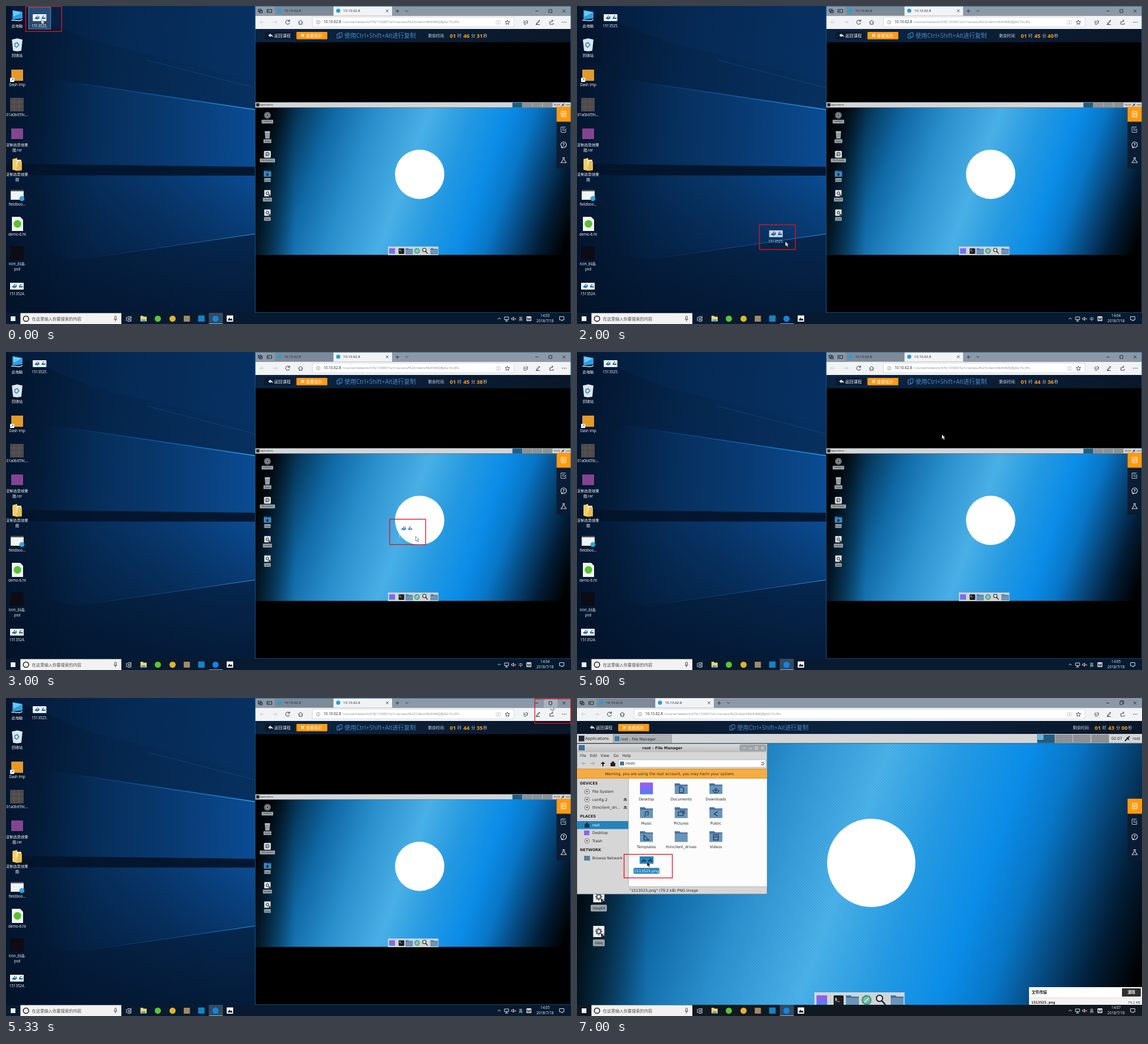
An HTML page that plays this animation: 960x540 px, repeating every 8 s.

```html
<!DOCTYPE html>
<html lang="zh">
<head>
<meta charset="utf-8">
<title>Drag a file into a remote desktop</title>
<style>
  html, body { margin: 0; width: 100%; height: 100%; overflow: hidden; background: #000; }
  svg { display: block; width: 960px; height: 540px; }
  text { font-family: "Open Sans", "Noto Sans CJK SC", "Noto Sans CJK", sans-serif; white-space: pre; }
  .dv { font-family: "DejaVu Sans", sans-serif; }
  .mono { font-family: "DejaVu Sans Mono", monospace; font-weight: bold; }
  .b { font-weight: bold; }
</style>
</head>
<body>
<svg id="stage" viewBox="0 0 960 540"></svg>
<script>
const LOOP = 8000;
const steps = [
  { at: 0, left: '46:31', clock: '14:03', ime: '英', box: [33.5, .7, 61, 42.5], cur: [60, 23], picked: true },
  { at: 1000, left: '45:44', clock: '14:04', ime: '中', box: [171, 184, 61, 43], cur: [215, 213], drag: [199, 200] },
  { at: 2000, left: '45:40', clock: '14:04', ime: '中', box: [310, 371.5, 61, 42], cur: [354, 400], drag: [338, 387] },
  { at: 3000, left: '45:38', clock: '14:04', ime: '中', box: [652, 284, 61, 43], cur: [696, 313], drag: [680, 300] },
  { at: 4000, left: '43:26', clock: '14:06', ime: '英', box: [753.5, 484.5, 206, 41.5], cur: [143, 317], transfer: true },
  { at: 5000, left: '44:36', clock: '14:05', ime: '英', cur: [620, 140] },
  { at: 5330, left: '44:35', clock: '14:05', ime: '英', box: [898.5, 1.5, 61, 41.5], cur: [926, 13], hover: true },
  { at: 6000, left: '44:16', clock: '14:06', ime: '英', box: [2.5, 256, 76, 55], cur: [36.5, 281], dark: true, max: true },
  { at: 7000, left: '43:00', clock: '14:07', ime: '英', box: [80, 265.5, 82, 40], cur: [119, 278], dark: true, max: true, files: true, transfer: true }
];

const rect = (x, y, w, h, fill, more = '') => `<rect x="${x}" y="${y}" width="${w}" height="${h}" fill="${fill}" ${more}/>`;
const dot = (x, y, r, fill, more = '') => `<circle cx="${x}" cy="${y}" r="${r}" fill="${fill}" ${more}/>`;
const line = (d, stroke, w = .8, fill = 'none') => `<path d="${d}" stroke="${stroke}" stroke-width="${w}" fill="${fill}"/>`;
const area = (d, fill, more = '') => `<path d="${d}" fill="${fill}" ${more}/>`;
// y is the middle of the line
const text = (x, y, s, size, fill, more = '') => `<text x="${x}" y="${y + size * .36}" font-size="${size}" fill="${fill}" ${more}>${s}</text>`;
const mid = (x, y, s, size, fill, more = '') => text(x, y, s, size, fill, 'text-anchor="middle" ' + more);
const move = (x, y, s) => `<g transform="translate(${x} ${y})">${s}</g>`;
const stops = list => list.map(([o, c, a = 1]) => `<stop offset="${o}" stop-color="${c}" stop-opacity="${a}"/>`).join('');
const grad = (id, x1, y1, x2, y2, list) =>
  `<linearGradient id="${id}" gradientUnits="userSpaceOnUse" x1="${x1}" y1="${y1}" x2="${x2}" y2="${y2}">${stops(list)}</linearGradient>`;

const defs = '<defs>' +
  grad('navy', 0, 0, 423, 60, [[0, '#03132a'], [.45, '#05264c'], [1, '#07305f']]) +
  grad('beam', 60, 0, 423, 0, [[0, '#0a4b8e', 0], [.5, '#0a4586', .45], [1, '#0b55a4', .75]]) +
  grad('edge', 110, 0, 423, 0, [[0, '#1673c4', 0], [.6, '#1673c4', .7], [1, '#3ca0ee']]) +
  grad('shade', 0, 0, 0, 521, [[.55, '#020d1f', 0], [1, '#020d1f', .6]]) +
  grad('sky', 0, 61, 1015, 428, [[0, '#000'], [.055, '#020d16'], [.14, '#07426b'], [.22, '#106ba8'], [.33, '#2b91d0'],
    [.47, '#4bb3ea'], [.58, '#259ce6'], [.68, '#0b8fec'], [.75, '#0878ca'], [.82, '#064a80'], [.89, '#021d36'], [.96, '#000']]) +
  grad('rim', 0, 0, 120, 0, [[0, '#000', .7], [1, '#000', 0]]) +
  grad('title', 0, 78, 0, 92, [[0, '#dadada'], [1, '#bdbdbd']]) +
  grad('view', 0, 143, 0, 164, [[0, '#a45cf0'], [1, '#4f7df2']]) +
  grad('bar', 0, 0, 960, 0, [[0, '#0a1728'], [.5, '#0b2440'], [1, '#0a1728']]) +
  '<pattern id="weave" width="5" height="5" patternUnits="userSpaceOnUse"><path d="M0 0L5 5" stroke="#002440" stroke-width=".8" opacity=".16"/></pattern></defs>';

const thumb = (x, y, tint = '#fff') => rect(x - 11.5, y - 6, 23, 11.5, tint) +
  area(`M${x - 9} ${y + 1}l4-3 2 2 2-4 1 5-4 2zM${x + 3} ${y + 2}l2-5 2 3 3-1v3z`, '#1b6fb5') +
  dot(x - 4, y - 3, 1, '#1d4f80') + dot(x + 7, y - 3, 1, '#1d4f80');

const label = (x, y, rows) => rows.split('|').map((s, i) => mid(x, y + i * 8.3, s, 6.2, '#fff')).join('');

function wallpaper(s) {
  const c = 19;
  return rect(0, 0, 424, 521, 'url(#navy)') +
    area('M0 0H423V128L150 60z', '#0a3c74', 'opacity=".16"') +
    area('M80 124L423 176V274L0 270V180z', 'url(#beam)') +
    area('M0 289L423 288V386L110 430 0 400z', 'url(#beam)') +
    rect(0, 0, 423, 521, 'url(#shade)') +
    area('M0 268L423 273V288L0 287z', '#031329', 'opacity=".85"') +
    line('M240 92L423 139', '#0d4b88', .7) +
    line('M100 128L423 176', 'url(#edge)', 1.6) + line('M110 432L423 387', 'url(#edge)', 1) +
    // desktop icons
    area('M11 7l17 3v11l-17 2z', '#2a9fe4') + area('M12 8l15 3-14 7z', '#6fc9f7') + line('M9 24l14 1 5-2', '#d5dde5', 1.5) +
    label(c, 34, '此电脑') +
    area('M10 57l9-2 9 2-2 19-7 1-7-1z', '#dfe6ec') + line('M15 64l4-2 3 4-4 4-3-2z', '#1f84d8', 1.5) + label(c, 84, '回收站') +
    rect(9, 108, 20, 19, '#e39a2a') + rect(7, 122, 7, 7, '#fff') + line('M9 127l3-3m-2 0h2v2', '#1c5fa8') + label(c, 134, 'Dash Imp') +
    rect(7, 156, 23, 23, '#4c4a4d') + line('M14 156v23M22 156v23M7 163h23M7 171h23', '#78604f', .6) + label(c, 185, '01a0b659c...') +
    rect(9, 208, 20, 18, '#84458f') + label(c, 236, '定制态势效果|图.rar') +
    area('M11 260l8-2v22l-8-2z', '#f5cf66') + rect(18, 261, 8, 17, '#f3ead0') + area('M21 263l6 1v15l-9 1v-5z', '#e9bd4e') + label(c, 286, '定制态势效果|图') +
    rect(8, 312, 22, 17, '#f1f4f6') + rect(8, 312, 22, 2.5, '#3c4650') + dot(27, 327, 4.3, '#2ba8d8') + label(c, 337, 'fieldboo...') +
    area('M10 358h14l5 5v19h-19z', '#f2f5f2') + dot(19.5, 370, 6.5, '#5ac12e') + label(c, 388, 'demo-6.ht') +
    rect(7, 408, 23, 23, '#0d0b14') + label(c, 438, 'icon_抖音.|psd') +
    thumb(18.5, 476) + label(c, 489, '1513524.') +
    (s.picked ? rect(38.5, 2, 37.5, 37, '#6aa6dc', 'fill-opacity=".35" stroke="#8dbbe2" stroke-width=".6"') : '') +
    thumb(57, 20) + label(57, 34, '1513525.');
}

const folder = (x, y, mark = '') => area(`M${x - 11} ${y - 9}h8l2 2h12v16h-22z`, '#46719a') +
  rect(x - 11, y - 5, 22, 14, '#6a94b9') + move(x, y + 2, line(mark, '#24435f', 1.4));

function linuxIcon(y, name, art, hot) {
  const w = name.length * 3.75 + 5;
  return move(37, y, art) + rect(37 - w / 2, y + 13.5, w, 11.5, hot ? '#1b6fa5' : '#9aa3a8', 'rx="1.5"') +
    mid(37, y + 19, name, 6.3, hot ? '#fff' : '#20282d', 'class="dv"');
}

function remoteDesk(s) {
  const gear = rect(-9.5, -9.5, 19, 19, '#eef0f1') + dot(0, 0, 3.6, 'none', 'stroke="#5c6367" stroke-width="2.4"') +
    line('M0-6.5V-4M0 4v2.5M-6 0h2M4 0h2M-4.3-4.3l1.4 1.4M2.9 2.9l1.4 1.4M4.3-4.3L2.9-2.9M-2.9 2.9l-1.4 1.4', '#5c6367', 1.8) +
    rect(4, 4, 6, 6, '#15191b') + line('M5 9l4-4m-3 0h3v3', '#fff', .8);
  const pager = [782, 812.5, 843, 874].map((x, i) => rect(x, 62, 29.8, 14.5, i ? '#8d9194' : '#1f5d82')).join('');
  return rect(0, 61, 960, 464, 'url(#sky)') + rect(0, 61, 960, 464, 'url(#weave)') + rect(0, 61, 120, 464, 'url(#rim)') +
    dot(500, 280, 75, '#fff') +
    rect(0, 61, 960, 16, '#d4d5d6') + rect(0, 76.5, 960, 1, '#42525d') + rect(3, 64, 9.5, 9.5, '#22282c') +
    text(14, 69, 'Applications', 6.6, '#222', 'class="dv"') + pager +
    text(908, 69, '02:' + s.clock.slice(3), 6.4, '#222', 'class="dv"') + line('M931 73l8-8M934 67l4 4', '#222', 1.8) +
    text(944, 69, 'root', 6.4, '#222', 'class="dv"') +
    (s.files ? rect(61.5, 62.5, 99, 14, '#aeb1b4', 'stroke="#85898c" stroke-width=".7"') + rect(64, 65, 8, 8, '#3f75a4') +
      text(74, 69.5, 'root - File Manager', 6.4, '#222', 'class="dv"') + rect(783, 63, 9, 7.5, '#5cb1e4', 'stroke="#dcefff" stroke-width=".5"') : '') +
    linuxIcon(100.5, 'config-2', dot(0, 0, 10.5, '#676c70') + dot(0, 0, 6, '#888d90') + dot(0, 0, 2, '#15181a')) +
    linuxIcon(160, 'Trash', area('M-8-10H8L6.500 11h-13z', '#a6abae') + line('M-4-7v15M0-7v15M4-7v15', '#70767a', 1.2) + rect(-8, -11, 16, 3, '#d9dcde', 'rx="1.5"')) +
    linuxIcon(218.5, 'File System', rect(-10.5, -10, 21, 21, '#d9dcdd', 'rx="3"') + dot(0, 0, 6.5, '#747b7e') + dot(0, 0, 3, '#d2d6d8') + line('M0 0l-5 6', '#444', 1.5)) +
    linuxIcon(278, 'Home', folder(0, 0) + rect(-11, -9, 22, 18, '#1f78bd', 'opacity=".55"') + area('M-5 2L0-3 5 2H3v5H-3V2z', '#123c5c'), s.max) +
    linuxIcon(337.500, 'idaq64', gear) + linuxIcon(396.5, 'idaq', gear) +
    // dock
    rect(404, 500.5, 152, 25, '#d0d4d7', 'stroke="#f1f3f4" stroke-width=".8"') +
    rect(407, 505, 18, 16, '#8d62e8') + rect(407, 514, 18, 7, '#5681ec') + rect(436, 505, 17, 17, '#1b1e20', 'rx="2"') +
    text(438, 511, '$_', 7, '#fff', 'class="mono"') + folder(468, 514) +
    dot(492, 513, 8.5, '#3a9b87') + dot(492, 513, 6, '#74bea8') + line('M488 517l8-8', '#eef4f0', 1.5) +
    dot(514, 510, 5.3, '#e2e6e8', 'stroke="#24282a" stroke-width="2"') + line('M518 514l6 7', '#24282a', 2.6) + folder(544, 514) +
    (s.files ? fileManager() : '');
}

function fileManager() {
  const dv = (x, y, s, fill = '#262626', cls = 'dv') => text(x, y, s, 6.35, fill, `class="${cls}"`);
  const marks = ['', 'M-3-5h4l3 3v7h-7z', 'M0-4v6m-3-3l3 3 3-3M-5 0a5 5 0 1 0 10 0', 'M-2 4v-7l5-1v6M-4 4h2M1 2h2', 'M-5-3h8v6h-8zM-2-5h7v6', 'M-3 0l6-4M-3 0l6 4M-4 0h2', 'M-4-4v8h8z', '', 'M-4-5v9h8v-9zM-4-1h8'];
  const names = ['Desktop', 'Documents', 'Downloads', 'Music', 'Pictures', 'Public', 'Templates', 'thinclient_drives', 'Videos'];
  const grid = names.map((n, i) => {
    const x = 118 + i % 3 * 59, y = 154 + Math.floor(i / 3) * 40.6;
    return (i ? folder(x, y, marks[i]) : rect(107, 143.5, 22, 20, 'url(#view)')) + mid(x, y + 18, n, 6.35, '#262626', 'class="dv"');
  }).join('');
  const side = [[159, 'File System', 26], [172.5, 'config-2', 26, 1], [186, 'thinclient_dri...', 26, 1], [229, 'Desktop', 26], [242.5, 'Trash', 26], [272, 'Browse Network', 26]];
  const eject = y => area(`M79 ${y}l3-3 3 3z`, '#333') + rect(79, y + 1, 6, 1, '#333');
  return rect(0, 78, 323, 255, '#d6d6d6', 'stroke="#6d7880" stroke-width=".8"') + rect(0, 78, 323, 14, 'url(#title)') +
    rect(3, 80, 10, 9, '#386f9e') + mid(145, 85, 'root - File Manager', 6.35, '#222', 'class="dv b"') +
    rect(276, 79, 46, 11.5, '#9fa4a7', 'rx="3"') + line('M282 84l2 2 2-2M293 86h4M303 83h4v4h-4zM313 83l4 4m0-4l-4 4', '#f4f4f4', .8) +
    ['File', 'Edit', 'View', 'Go', 'Help'].map((m, i) => dv([5, 22, 40, 62, 77][i], 97.5, m)).join('') +
    area('M7 111l4-3v2h4v2h-4v2zM31 111l-4-3v2h-4v2h4v2z', '#b2b2b2') + area('M40 112l4-4 4 4h-3v4h-2v-4zM56 112l5-5 5 5h-1v4h-8v-4z', '#222') +
    rect(70.5, 105, 250.5, 12.5, '#fff', 'stroke="#a5a5a5" stroke-width=".6"') + rect(73, 108, 7, 6.5, '#3d759f') + dv(82, 111, '/root/') +
    line('M313 112a2.500 2.500 0 1 0 2-3l-2 1', '#222', .9) +
    rect(0, 120, 323, 16.5, '#f6ac42') + line('M0 120.500H323M0 136H323', '#c38327', .7) +
    mid(158, 128.5, 'Warning, you are using the root account, you may harm your system.', 6.35, '#3c2b12', 'class="dv"') +
    rect(87.5, 137, 235, 183.5, '#fcfcfc') + line('M87.500 137V320.500H323', '#a3a3a3', .7) +
    dv(5, 144.5, 'DEVICES', '#222', 'dv b') + dv(5, 201, 'PLACES', '#222', 'dv b') + dv(5, 257.5, 'NETWORK', '#222', 'dv b') +
    rect(0, 209, 87, 13.5, '#2583b8') + area('M12 216l5-5 5 5h-1v4h-8v-4z', '#123348') + dv(26, 215.5, 'root', '#fff') +
    side.map(([y, n, x, e], i) => (i == 3 ? rect(12, y - 4, 9, 8, '#8666ea') : i == 5 ? rect(12, y - 4, 10, 8, '#57809f') :
      dot(17, y, 4, '#e8e8e8', 'stroke="#656565" stroke-width=".9"') + dot(17, y, 1.4, '#555')) + dv(x, y, n) + (e ? eject(y) : '')).join('') +
    grid + rect(106.500, 269, 23.500, 12.500, '#2583b8') + line('M110 278l4-3 3 3m4 0l4-4 2 4', '#0b3452', 1.8) +
    rect(96, 288.5, 44, 10, '#2583b8', 'rx="2"') + mid(118, 293.5, '1513525.png', 6.35, '#fff', 'class="dv"') +
    dv(89, 326.5, '"1513525.png" (79.2 kB) PNG image');
}

function header(ox, s) {
  const tx = s.max ? 842.5 : 717, [m, sec] = s.left.split(':');
  const num = (x, v) => text(tx + x, 50.5, v, 9.3, '#ff9d1c', 'class="b"');
  const word = (x, v) => text(tx + x, 51, v, 6.7, '#d5dbe2');
  const cx = s.max ? 259 : 562;
  return rect(ox, 39, 960 - ox, 22.5, 'url(#bar)') +
    move(ox, 0, rect(16, 43.500, 50, 13, '#0a1626', 'opacity=".6"') + area('M22 50l4-3.500v2q4 0 4 4.500q-1-2-4-2v2z', '#e3e8ee') + text(32, 50.5, '返回课程', 7.1, '#e3e8ee') +
      rect(70, 44, 52.5, 12.5, '#ff9a12', 'rx="1"') + line('M78 47.500l5 5m0-5l-5 5', '#fff', 1.3) + text(86, 50.5, '查看拓扑', 7.1, '#fff')) +
    line(`M${cx + 4} 45.500h5v7h-5zM${cx + 3} 47.500h-2.500v7h5v-1.500`, '#4c8aca', 1) +
    text(cx + 13, 50.5, '使用Ctrl+Shift+Alt进行复制', 10, '#4c8aca') +
    word(0, '剩余时间:') + num(37, '01') + word(50, '时') + num(60, m) + word(73.5, '分') + num(82.5, sec) + word(94, '秒');
}

function sidePanel() {
  return rect(935.5, 171, 24.5, 105, '#0b1c31', 'opacity=".92"') + rect(935.5, 171, 24.5, 25.5, '#ff9a12') +
    line('M943.500 179h8v9h-8zM945 182h5M945 184h5M945 186h3', '#fff', .9) +
    line('M951 210v4.500h-8v-9h8M945 208h4M945 210.500h3M948 212l4-4', '#c8d1dc', .9) +
    dot(947.5, 235.5, 4.7, 'none', 'stroke="#e1e7ed" stroke-width="1.1"') + mid(947.5, 235.5, '?', 7, '#fff', 'class="b"') + line('M944 239v2l3-1', '#e1e7ed', 1) +
    line('M945.500 257.500h4M946.500 258v3l-3.500 5h9l-3.500-5v-3', '#c8d1dc', 1.1);
}

function transfer(x) {
  return rect(x, 491, 960 - x, 30, '#fff') + text(x + 4.5, 499.5, '文件传输', 6.5, '#222', 'class="b"') +
    rect(x + 158, 493, 32, 14, '#2f2f2f') + mid(x + 174, 500, '清除', 6.5, '#fff', 'class="b"') +
    rect(x, 509, 960 - x, 12, '#f3f3f3') + line(`M${x} 509H960`, '#ccc', .6) +
    text(x + 4, 516.5, '1513525.png', 6.1, '#222', 'class="mono"') + text(957, 516.5, '79.2 KB', 6, '#333', 'text-anchor="end"');
}

function browser(s) {
  const ox = s.max ? 0 : 423.5, ink = '#1d252d';
  const tabIcon = x => dot(x, 8, 3.5, '#2d9bd6');
  return rect(ox, 0, 960 - ox, 521, '#000') + rect(ox, 0, 960 - ox, 16.5, '#8b99a7') +
    move(ox, 0, rect(33, 1, 100, 15.5, '#7d8a98') + rect(133, 0.5, 99.5, 16, '#f1f3f5') +
      line('M5 5.500h5v4h-5zM7 7.500h5v4h-5zM20 6h8v5h-8zM24 8.500h-3', ink, 1) +
      tabIcon(41) + text(49, 8, '10.10.62.8', 6, ink) + tabIcon(141) + text(149.5, 8, '10.10.62.8', 6, ink) +
      line('M222 6l4.500 4.500m0-4.500l-4.500 4.500M238.500 8.500h6M241.500 5.500v6M255 7l2.500 2.500 2.500-2.500', ink)) +
    (s.hover ? rect(914, 0.5, 23, 15.5, '#a9b4be') : '') +
    line('M899.500 8.500h5M922.500 6h5v5h-5zM945.500 6l5 5m0-5l-5 5', ink, .9) + (s.max ? line('M924 6v-1.500h5v5h-1.500', ink) : '') +
    rect(ox, 16.5, 960 - ox, 22.5, '#f1f3f5') + rect(ox + 97, 19, 863 - ox - 97, 16.500, '#fff', 'stroke="#c9ced3" stroke-width=".7"') +
    move(ox, 0, line('M15 27.500h-7l3-3m-3 3l3 3M30 27.500h7l-3-3m3 3l-3 3', '#c1c6cb') +
      line('M58 25.500a3.500 3.500 0 1 0 .5 3M58.500 23v3h-3M73 28l4-4 4 4M74.500 27v4h5v-4', ink, .9) +
      dot(107, 27.5, 3, 'none', 'stroke="#777" stroke-width=".7"') + line('M107 27v2M107 25.500v.7', '#777') +
      text(116, 26.5, '10.10.62.8', 6.2, ink) + text(148, 26.5, '/course/network/476/13385/?url=/access/%23/client/MzE4MQBjAG15c3Fs', 5.8, '#858b91')) +
    line('M833 25h3.500v5.500H833zM836.500 25h3.500v5.500h-3.500z', '#bcc1c5', .7) +
    line('M852 24l1.100 2.400 2.700.2-2 1.900.6 2.700-2.400-1.400-2.400 1.400.6-2.700-2-1.900 2.700-.2z', ink) +
    line('M879 26h4M879 28.500h4M880 31h4M884 24l1 2h2l-1.500 1.500.5 2-2-1M901 30l5-6 1 1-5 6zM900 31.500h7M924 26v5h6v-2M925 28q1-3 4-3m-1.500-2l2 2-2 2', ink) +
    [945.5, 948.5, 951.5].map(x => dot(x, 27.5, .65, ink)).join('') +
    header(ox, s) +
    (s.max ? remoteDesk(s) : `<g transform="translate(423.5 129.500) scale(.5588 .5583)">${remoteDesk(s)}</g>`) +
    sidePanel() + (s.transfer ? transfer(s.max ? 768 : 766.5) : '') +
    (s.max ? '' : rect(423.3, .3, 536.4, 520.4, 'none', 'stroke="#1763a0" stroke-width=".8"'));
}

function taskbar(s) {
  const w = '#eef2f5';
  return rect(0, 521, 960, 19, s.max ? '#101820' : '#071a30') + rect(8, 527, 8, 8, w) +
    rect(24.5, 521.5, 171.5, 18.5, '#f2f2f2') + dot(34, 531, 4.6, 'none', 'stroke="#1c1c1c" stroke-width="1.5"') + text(44, 531, '在这里输入你要搜索的内容', 7, '#4c4c4c') +
    rect(184.7, 526.5, 2.8, 5.5, 'none', 'rx="1.4" stroke="#333" stroke-width=".8"') + line('M183 531q3 4 6 0M186 533v2.500', '#333') +
    line('M204.500 528v7M207 527.500h4v3h-4zM207 532.500h4v3h-4zM212.500 526.500v9', w) +
    area('M228.500 526h4l1 1.500h5.500v8h-10.500z', '#f6d66c') + rect(230.500, 532, 6.500, 3.500, '#4da3df') +
    dot(258, 531, 5.3, '#5cc532') + dot(283, 531, 5.3, '#e2b42c') + rect(302, 526, 10.500, 10, '#a18a64') + rect(326.500, 525.500, 11, 10.500, '#1384c4') +
    (s.drag ? '' : rect(344.5, 521, 24, 19, '#334a60')) + rect(345, 539, 23, 1, '#75b9ea') + dot(356, 531, 5.3, '#1684dc') +
    rect(375, 525.5, 11, 10.5, '#fff') + area('M376.500 534l3-5 2 3 1.500-2 2 4z', '#101820') +
    line('M835.500 532l2.500-2.500 2.500 2.500M847 528h7v4.500h-7zM850.500 532.500v2.500M848 535h5M859 530h1.500l2-2v6l-2-2H859zM864 530l2.500 2.500m0-2.500l-2.500 2.500', w, .9) +
    line('M863.500 530l3 3m0-3l-3 3', '#e33', 1) + mid(874.5, 531, s.ime, 7, w) +
    rect(884.5, 527, 8, 8, w) + mid(888.5, 531, 'M', 7, '#10151b', 'class="b"') +
    mid(916, 526, s.clock, 6.2, w) + mid(916, 535, '2018/7/18', 6.2, w) + line('M940.500 527.500h7.500v5.500h-3v2l-2-2h-2.500z', w, .9);
}

const cursor = ([x, y], dark) => area(`M${x} ${y}v8l1.900-1.700 1.300 2.900 1.500-.7-1.300-2.800h2.500z`, dark ? '#111' : '#fff', `stroke="${dark ? '#ddd' : '#111'}" stroke-width=".5"`);

function scene(s) {
  return defs + (s.max ? '' : wallpaper(s)) + browser(s) + taskbar(s) +
    (s.drag ? move(...s.drag, `<g opacity=".8">${thumb(0, 0) + label(0, 13, '1513525.')}</g>`) : '') +
    cursor(s.cur, s.dark) + (s.box ? rect(...s.box, 'none', 'stroke="#e5121c" stroke-width="1.3"') : '');
}

const stage = document.getElementById('stage');
const start = performance.now();
let shown;
function tick() {
  const t = (performance.now() - start) % LOOP;
  const now = steps.filter(s => s.at <= t).pop();
  if (now !== shown) stage.innerHTML = scene(shown = now);
  requestAnimationFrame(tick);
}
tick();
</script>
</body>
</html>
```
